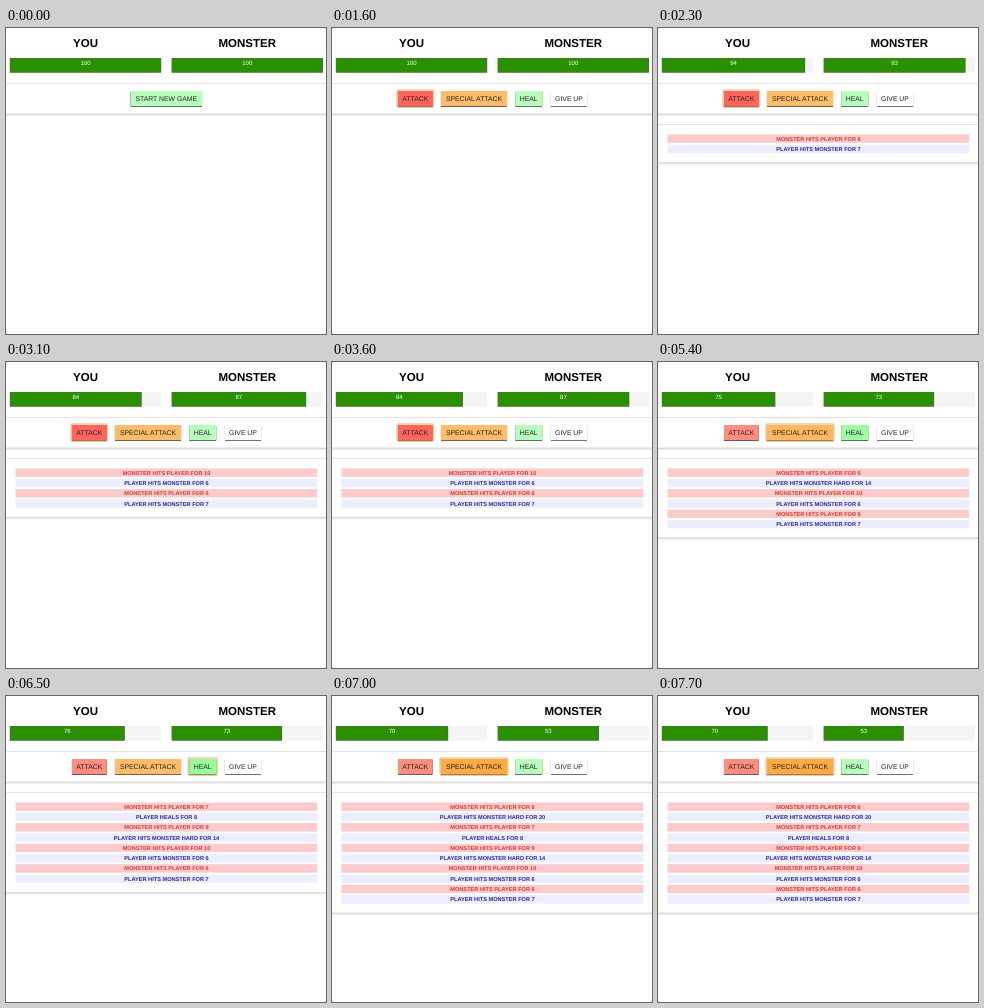
An HTML page for the animation above (8 s loop, 320 by 306 pixels).

```html
<!DOCTYPE html>
<html lang="en">
<head>
<meta charset="utf-8">
<title>Monster battle</title>
<style>
  html, body { margin: 0; width: 100%; height: 100%; overflow: hidden; background: #fff; }
  svg { display: block; width: 320px; height: 306px; }
  text { font-family: "Liberation Sans", Arial, sans-serif; text-anchor: middle; text-rendering: geometricPrecision; }
</style>
</head>
<body>
<svg id="stage" viewBox="0 0 320 306"></svg>
<script>
const LOOP = 8000, START = 400;

// time, health of both, log lines newest first
const turns = [
  { t: 0, hp: [100, 100], log: [] },
  { t: 2000, hp: [94, 93], log: ["MONSTER HITS PLAYER FOR 6", "PLAYER HITS MONSTER FOR 7"] },
  { t: 2900, hp: [84, 87], log: ["MONSTER HITS PLAYER FOR 10", "PLAYER HITS MONSTER FOR 6"] },
  { t: 4000, hp: [75, 73], log: ["MONSTER HITS PLAYER FOR 9", "PLAYER HITS MONSTER HARD FOR 14"] },
  { t: 5500, hp: [76, 73], log: ["MONSTER HITS PLAYER FOR 7", "PLAYER HEALS FOR 8"] },
  { t: 6900, hp: [70, 53], log: ["MONSTER HITS PLAYER FOR 6", "PLAYER HITS MONSTER HARD FOR 20"] }
];

const green = [184, 255, 190];
const buttons = [
  { label: "ATTACK", x: 66, w: 34.6, base: [255, 141, 128], hover: [255, 101, 92] },
  { label: "SPECIAL ATTACK", x: 109, w: 66, base: [255, 188, 105], hover: [255, 170, 66] },
  { label: "HEAL", x: 183.2, w: 27, base: green, hover: [150, 255, 153] },
  { label: "GIVE UP", x: 219, w: 36, base: [255, 255, 255], hover: [210, 210, 210] }
];
const hovers = [[START, 0], [3900, 1], [5300, 2], [6800, 1]];
const focuses = [[START, 0], [4000, 1], [5500, 2], [6900, 1]];

const clamp = v => Math.max(0, Math.min(1, v));
const mix = (a, b, p) => a + (b - a) * p;
const mixColor = (a, b, p) => a.map((v, i) => Math.round(mix(v, b[i], p)));
const easeOut = p => 1 - (1 - clamp(p)) ** 2;

// cubic-bezier(.25, .1, .25, 1)
function ease(p) {
  p = clamp(p);
  let lo = 0, hi = 1, s = p;
  for (let i = 0; i < 20; i++) {
    s = (lo + hi) / 2;
    const x = .75 * s * (1 - s) ** 2 + .75 * s * s * (1 - s) + s ** 3;
    if (x < p) lo = s; else hi = s;
  }
  return .3 * s * (1 - s) ** 2 + 3 * s * s * (1 - s) + s ** 3;
}

const rect = (x, y, w, h, fill, more = "") =>
  `<rect x="${x}" y="${y}" width="${w}" height="${h}" fill="${fill}" ${more}/>`;
const text = (s, x, y, size, fill, weight = 400) =>
  `<text x="${x}" y="${y}" font-size="${size}" fill="${fill}" font-weight="${weight}">${s}</text>`;

function panel(y, h) {
  return rect(-1, y + 1, 322, h, "#ccc", 'filter="url(#blur)"') +
    rect(-1, y, 322, h, "#fff", 'stroke="#d2d2d2" stroke-width=".5"');
}

function bar(x, hp, width) {
  const w = 151.4 * width / 100;
  return rect(x, 30, 151.4, 14.7, "#f4f4f4") +
    rect(x, 30, w, 14.7, "#4c6b40") +
    rect(x + .4, 30.4, w - 1.5, 13.8, "#2b9000") +
    text(hp, x + w / 2, 37.2, 6, "#fff");
}

function button(label, x, w, color, focused) {
  const ring = focused
    ? rect(x - .9, 62.1, w + 1.8, 17.2, "none", 'rx="1.2" stroke="#e3b978" stroke-width="1.5" stroke-opacity=".75"') : "";
  return rect(x - .1, 63.5, w + .2, 15.4, "#444", 'rx=".6" filter="url(#soft)"') +
    rect(x, 63, w, 15.2, `rgb(${color})`, 'rx=".5"') + ring +
    text(label, x + w / 2, 73.4, 6.85, "#222");
}

const last = (list, t) => list.filter(e => e[0] <= t).pop();

function controls(t) {
  if (t < START) return button("START NEW GAME", 124.5, 71.5, green, false);
  const [since, over] = last(hovers, t);
  const before = last(hovers, since - 1);
  const focus = last(focuses, t)[1];
  return buttons.map((b, i) => {
    let color = b.base;
    if (i === over) {
      // the first button inherits the start button's colour
      color = since === START
        ? mixColor(green, b.hover, easeOut((t - since) / 300))
        : mixColor(b.base, b.hover, easeOut((t - since) / 200));
    } else if (before && i === before[1]) {
      color = mixColor(b.hover, b.base, easeOut((t - since) / 200));
    }
    return button(b.label, b.x, b.w, color, i === focus);
  }).join("");
}

function battleLog(lines) {
  if (!lines.length) return "";
  return panel(96.7, 17.2 + lines.length * 10.3) + lines.map((line, i) => {
    const y = 106.4 + i * 10.3, monster = line.startsWith("MONSTER");
    return rect(9.5, y, 301.7, 8.5, monster ? "#fccccc" : "#ecedfd") +
      text(line, 160.5, y + 6.2, 5.63, monster ? "#d43a32" : "#2a24a8", 700);
  }).join("");
}

function draw(t) {
  const done = turns.filter(e => e.t <= t);
  const now = done[done.length - 1], prev = done[done.length - 2] || now;
  const p = ease((t - now.t) / 500);
  const width = i => mix(prev.hp[i], now.hp[i], p);
  const lines = done.reduce((all, e) => e.log.concat(all), []);
  return `<defs>
    <filter id="blur" x="-5%" y="-30%" width="110%" height="160%"><feGaussianBlur stdDeviation=".9"/></filter>
    <filter id="soft" x="-10%" y="-20%" width="120%" height="140%"><feGaussianBlur stdDeviation=".2"/></filter>
    </defs>` +
    rect(0, 0, 320, 306, "#ddd") + rect(0, 0, 320, 306, "#fff", 'rx="2"') +
    text("YOU", 79.5, 18.6, 11.5, "#000", 700) +
    text("MONSTER", 241.2, 18.6, 11.5, "#000", 700) +
    bar(3.8, now.hp[0], width(0)) + bar(165.6, now.hp[1], width(1)) +
    panel(55.6, 30.3) + controls(t) + battleLog(lines);
}

const stage = document.getElementById("stage");
const begin = performance.now();
function tick() {
  stage.innerHTML = draw((performance.now() - begin) % LOOP);
  requestAnimationFrame(tick);
}
tick();
</script>
</body>
</html>
```
